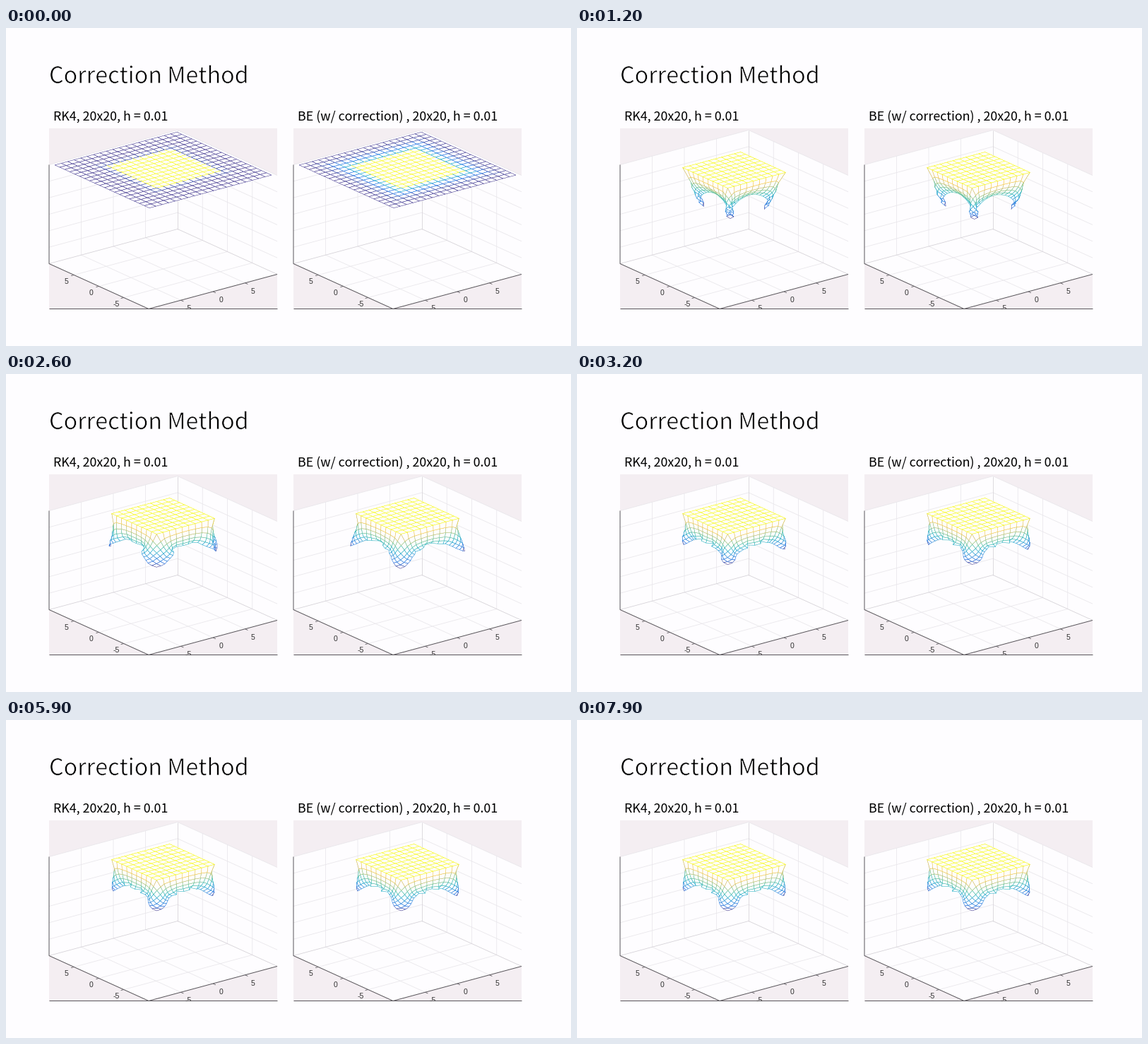
Write a matplotlib script that moves like this. It is 800 by 450 pixels and loops after 8 s.

```python
import numpy as np
import matplotlib.pyplot as plt
from matplotlib.animation import FuncAnimation
from matplotlib.collections import PolyCollection
from matplotlib.colors import LinearSegmentedColormap
from matplotlib.patches import Polygon, Rectangle
from matplotlib.patheffects import Stroke

W, H, DPI = 800, 450, 100
PX = 72 / DPI                      # one pixel in points
FRAMES, STEP_MS = 80, 100
N, HALF, TABLE = 20, 9.5, 4.5
DEPTH = 60                         # height of the axes box
BG, PANEL = "#fefdff", "#f4eef2"
DARK, FAINT, EDGE = "#5a575c", "#e9e7eb", "#d6d3d8"

PARULA = LinearSegmentedColormap.from_list("parula", [
    (.208, .166, .529), (.012, .390, .882), (.078, .504, .838),
    (.023, .642, .791), (.199, .721, .631), (.530, .749, .466),
    (.819, .733, .350), (.996, .786, .197), (.976, .983, .054)])


def project(p, ox):
    """Orthographic view of (x, y, z) onto the stage."""
    p = np.asarray(p, float)
    x, y, z = p[..., 0], p[..., 1], p[..., 2]
    return np.stack([ox + 161.5 + 9.1 * x - 7.05 * y,
                     201 - 2.45 * x - 3.2 * y - 140 / DEPTH * z], -1)


def nearness(p):
    return -.0527 * p[..., 0] - .0687 * p[..., 1] + p[..., 2] / DEPTH


# ---- cloth simulation -------------------------------------------------

FULL, HEAD, TAIL = slice(None), slice(None, -1), slice(1, None)
GRAVITY, STRUCT, SHEAR = 110.0, 200.0, 80.0
SPRINGS = [((HEAD, FULL), (TAIL, FULL), 1.0, STRUCT),
           ((FULL, HEAD), (FULL, TAIL), 1.0, STRUCT),
           ((HEAD, HEAD), (TAIL, TAIL), 2 ** .5, SHEAR),
           ((HEAD, TAIL), (TAIL, HEAD), 2 ** .5, SHEAR)]


def simulate(drag, spread, damp=.5, substeps=20):
    axis = np.linspace(-HALF, HALF, N)
    x, y = np.meshgrid(axis, axis, indexing="ij")
    gap = np.maximum(np.maximum(abs(x), abs(y)) - TABLE, 0)
    free = (gap > 0)[..., None]
    pos = np.stack([x, y, -1e-3 * (1 - np.exp(-gap / spread))], -1)
    vel = np.zeros_like(pos)
    dt = STEP_MS / 1000 / substeps
    poses = [pos]
    for _ in range((FRAMES - 1) * substeps):
        acc = -drag * vel
        acc[..., 2] -= GRAVITY
        for a, b, rest, k in SPRINGS:
            d = pos[b] - pos[a]
            length = np.sqrt((d * d).sum(-1, keepdims=True)) + 1e-9
            d /= length
            rate = ((vel[b] - vel[a]) * d).sum(-1, keepdims=True)
            pull = (k * (length - rest) + damp * rate) * d
            acc[a] += pull
            acc[b] -= pull
        vel = (vel + dt * acc) * free
        pos = pos + dt * vel
        poses.append(pos)
    return poses[::substeps]


# ---- static scene -----------------------------------------------------

fig = plt.figure(figsize=(W / DPI, H / DPI), dpi=DPI, facecolor=BG)
ax = fig.add_axes([0, 0, 1, 1])
ax.set(xlim=(0, W), ylim=(H, 0))
ax.axis("off")


def line(pts, color, width=.8, z=2):
    ax.plot(*np.transpose(pts), color=color, lw=width * PX, zorder=z,
            solid_capstyle="butt")


def label(x, y, s, size, font="Noto Sans CJK JP", **kw):
    return ax.text(x, y, s, fontsize=size * PX, family=font, zorder=6, **kw)


def draw_box(ox):
    frame = Rectangle((ox, 142), 323, 255.5, fc=PANEL, ec="none", zorder=0)
    ax.add_patch(frame)

    def edge(pts, color, width=.8):
        line(project(pts, ox), color, width)

    def wall(pts):
        ax.add_patch(Polygon(project(pts, ox), fc=BG, ec="none", zorder=1))

    lo, hi, floor = -10, 10, -DEPTH
    wall([(lo, hi, 0), (hi, hi, 0), (hi, hi, floor), (lo, hi, floor)])
    wall([(hi, hi, 0), (hi, lo, 0), (hi, lo, floor), (hi, hi, floor)])
    wall([(lo, lo, floor), (hi, lo, floor), (hi, hi, floor), (lo, hi, floor)])
    for t in (-5, 0, 5):
        edge([(t, lo, floor), (t, hi, floor), (t, hi, 0)], FAINT)
        edge([(lo, t, floor), (hi, t, floor), (hi, t, 0)], FAINT)
    for h in range(10 - DEPTH, 1, 10):
        edge([(lo, hi, h), (hi, hi, h), (hi, lo, h)], FAINT)
    edge([(lo, hi, floor), (hi, hi, floor), (hi, lo, floor)], EDGE)
    edge([(hi, hi, floor), (hi, hi, 0)], EDGE)
    edge([(lo, hi, 0), (lo, hi, floor), (lo, lo, floor), (hi, lo, floor)], DARK, 1)
    line([(ox, 397.3), (ox + 323, 397.3)], DARK, 1)

    for t in (-5, 0, 5):
        for p, out, dx, dy in (((lo, t, floor), (lo - .45, t, floor), -11, 9),
                               ((t, lo, floor), (t, lo - .55, floor), 11, 11)):
            edge([p, out], DARK)
            x, y = project(p, ox)
            text = label(x + dx, y + dy, str(t), 10.5, "Liberation Sans",
                         color="#333333", ha="center", va="center_baseline",
                         clip_on=True)
            text.set_clip_path(frame)


label(61, 78, "Correction Method", 32.3, va="baseline", color="black",
      path_effects=[Stroke(linewidth=.7 * PX, foreground=BG)])
label(67, 131, "RK4, 20x20, h = 0.01", 17.9, va="baseline", color="black")
label(413, 131, "BE (w/ correction) , 20x20, h = 0.01", 17.9, va="baseline",
      color="black")


# ---- moving mesh ------------------------------------------------------

def corners(a):
    """Values at the four corners of every cell, in ring order."""
    cells = (a[:-1, :-1], a[1:, :-1], a[1:, 1:], a[:-1, 1:])
    return np.stack([c.reshape(-1, *a.shape[2:]) for c in cells], 1)


class Cloth:
    def __init__(self, ox, **physics):
        self.ox = ox
        self.poses = simulate(**physics)
        count = (N - 1) ** 2
        faces = np.zeros((count, 5, 4))
        faces[:, 0] = (254 / 255, 253 / 255, 1, 1)
        self.mesh = PolyCollection(np.zeros((count * 5, 4, 2)), zorder=4,
                                   facecolors=faces.reshape(-1, 4),
                                   linewidths=.5 * PX, joinstyle="bevel")
        ax.add_collection(self.mesh, autolim=False)
        draw_box(ox)

    def show(self, i):
        pos = self.poses[i]
        z = pos[..., 2]
        tint = PARULA((z - z.min()) / (z.max() - z.min()))
        order = np.argsort(corners(nearness(pos)).mean(1), kind="stable")
        q = corners(project(pos, self.ox))[order]
        c = corners(tint)[order]
        # each cell: its face, then four edges tinted by their lower-index end
        shapes, inks = [q], [np.zeros_like(c[:, 0])]
        for a, b in ((0, 1), (1, 2), (3, 2), (0, 3)):
            shapes.append(q[:, [a, a, b, b]])
            inks.append(c[:, a])
        self.mesh.set_verts(np.stack(shapes, 1).reshape(-1, 4, 2))
        self.mesh.set_edgecolor(np.stack(inks, 1).reshape(-1, 4))
        return self.mesh


cloths = [Cloth(61, drag=2.0, spread=.3),
          Cloth(407, drag=2.15, spread=1.0)]


def update(i):
    return [cloth.show(i) for cloth in cloths]


anim = FuncAnimation(fig, update, frames=FRAMES, interval=STEP_MS,
                     repeat=True, repeat_delay=0)
plt.show()
```
